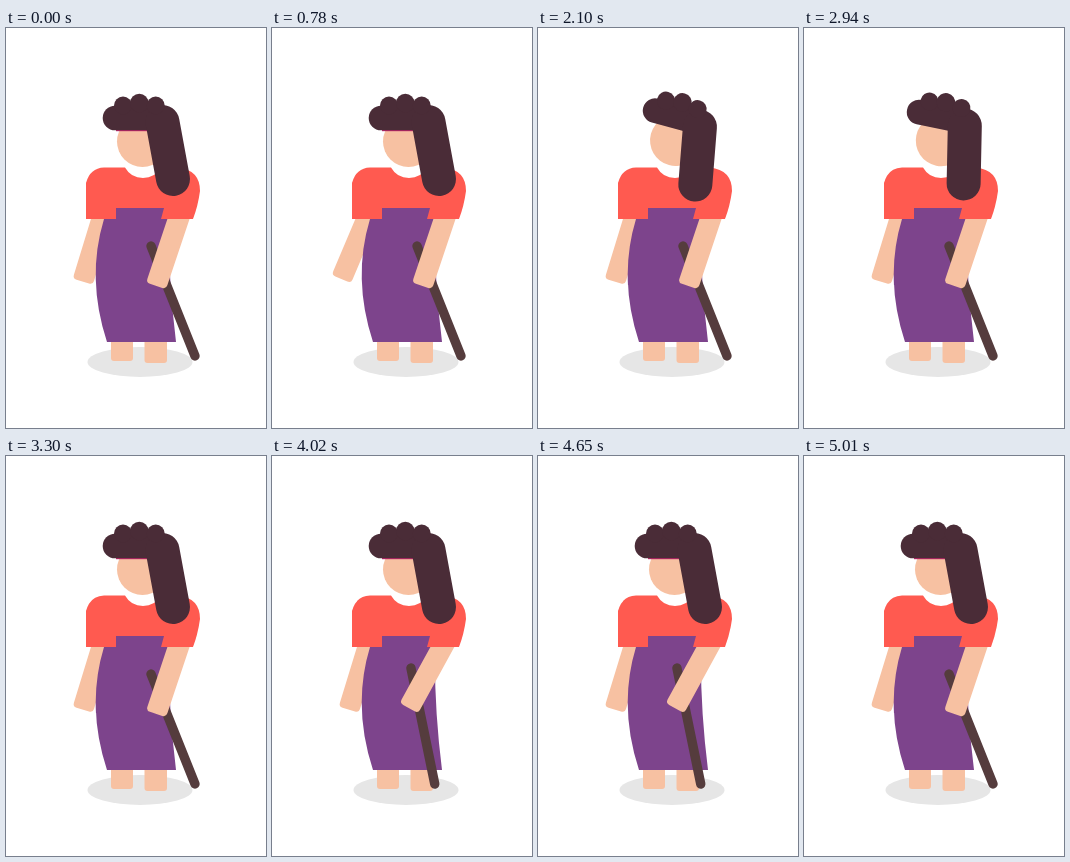
Write an HTML page that moves like this. It is 260 px wide and 400 px high and loops after 5970 ms.

```html
<!DOCTYPE html>
<html lang="en">
<head>
<meta charset="utf-8">
<title>Woman with a cane</title>
<style>
  html, body { margin: 0; width: 100%; height: 100%; overflow: hidden; background: #fff; }
  svg { display: block; width: 100vw; height: 100vh; }
  .skin { fill: #f7c1a2; }
  .hair { fill: #4a2c37; stroke: #4a2c37; stroke-linecap: round; }
</style>
</head>
<body>
<svg viewBox="0 0 260 400">
  <ellipse cx="134" cy="334" rx="52.5" ry="15" fill="#e6e6e6"/>
  <g class="skin">
    <rect x="105" y="306" width="22" height="27" rx="3"/>
    <rect x="138.5" y="306" width="22.5" height="29" rx="3"/>
    <g id="leftArm"><rect x="-10.5" y="-5" width="21" height="81" rx="4" transform="translate(99 181) rotate(17)"/></g>
  </g>
  <path d="M110 178H158L163 191Q162 250 170 314H101Q80 250 98 191Z" fill="#7d448c"/>
  <g id="rightArm">
    <path d="M145 218L189 328" stroke="#553c3d" stroke-width="9.4" stroke-linecap="round"/>
    <rect class="skin" x="-10.5" y="-5" width="21" height="86" rx="4" transform="translate(175.8 181) rotate(18.5)"/>
  </g>
  <path d="M80 191V155Q84 140 98 139.5H119Q125 150 137 150T155 139.5H172Q194 142 194 163Q192 178 187 191H155L158 180H110V191Z" fill="#ff5a50"/>
  <g id="head">
    <circle class="skin" cx="136.5" cy="113.5" r="25.5"/>
    <path id="band" d="M110 102.5H142" stroke="#c0246a" stroke-width="1.4"/>
    <g class="hair">
      <path d="M109 90H150" stroke-width="24.6"/>
      <path d="M156.5 94L167 151" stroke-width="34"/>
      <g stroke="none">
        <circle cx="117" cy="77.5" r="9"/>
        <circle cx="133.3" cy="75" r="9.3"/>
        <circle cx="149.7" cy="77.5" r="9"/>
      </g>
    </g>
  </g>
</svg>
<script>
  const LOOP = 5970;
  const part = id => document.getElementById(id);
  const clamp = x => Math.min(1, Math.max(0, x));
  const easeOut = x => Math.sin(clamp(x) * Math.PI / 2);
  const easeInOut = x => (1 - Math.cos(clamp(x) * Math.PI)) / 2;

  // A quick swing out followed by a softer return, 600 ms in all.
  const swing = (t, start) => easeOut((t - start) / 240) - easeInOut((t - start - 240) / 360);

  function turn(id, angle, x, y) {
    part(id).setAttribute('transform', `rotate(${angle} ${x} ${y})`);
  }

  function draw(now) {
    const t = now % LOOP;
    const nod = easeOut((t - 1650) / 450) - easeOut((t - 2880) / 420);
    turn('leftArm', 8 * swing(t, 420), 99, 181);
    turn('rightArm', 10.2 * (swing(t, 3780) + swing(t, 4410)), 175.5, 181);
    turn('head', 15 * nod, 141, 117);
    part('band').style.opacity = nod > 0 ? 0 : 1;
  }

  const begin = performance.now();
  function tick() {
    draw(performance.now() - begin);
    requestAnimationFrame(tick);
  }
  tick();
</script>
</body>
</html>
```
